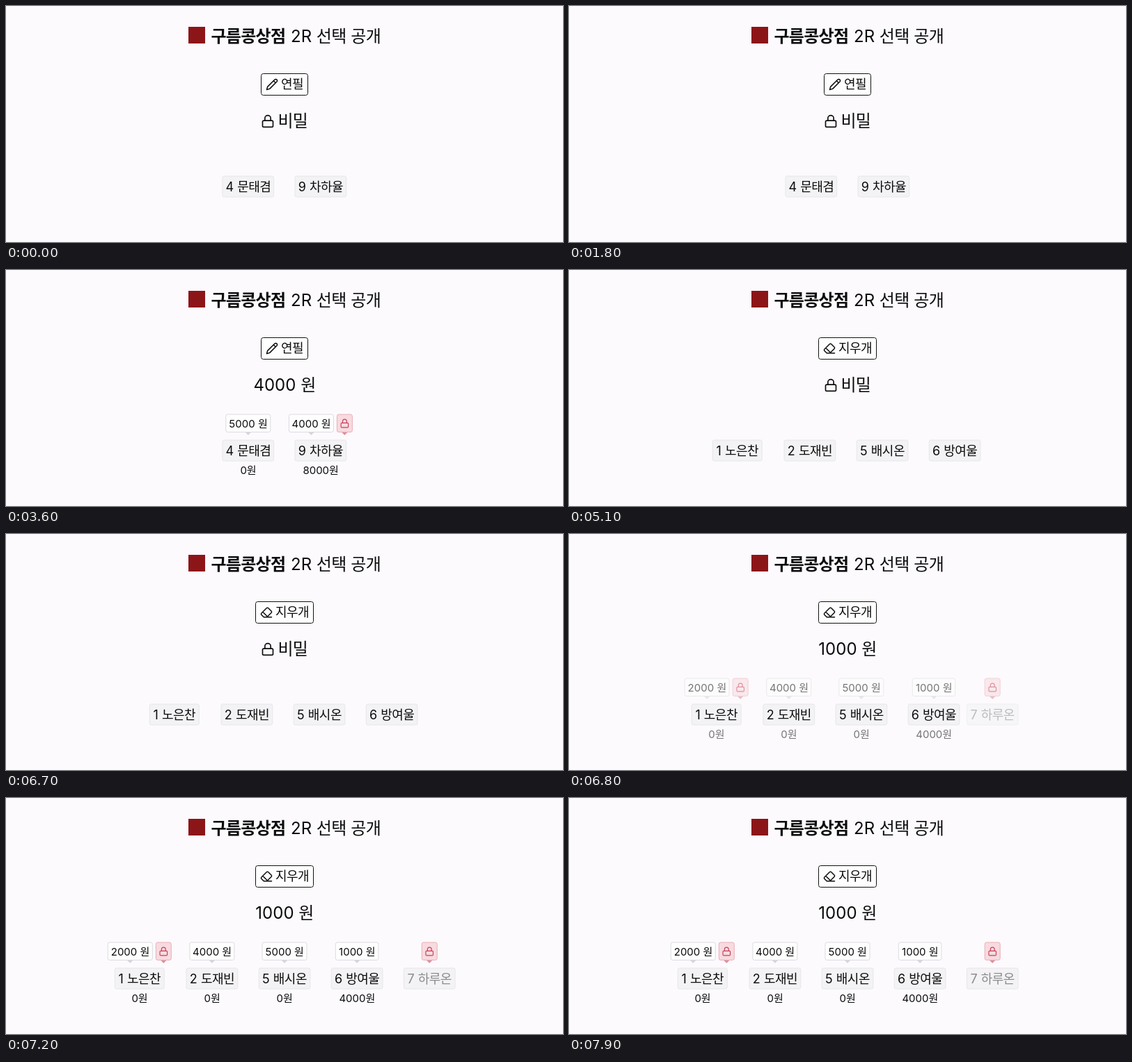
Animation, 800 px wide and 340 px high, one loop 8000 ms. Source, as an HTML page:

```html
<!DOCTYPE html>
<html lang="ko">
<head>
<meta charset="utf-8">
<style>
  html, body { margin: 0; height: 100%; overflow: hidden; background: #fcfafd; }
  svg { display: block; }
  text { font-family: Inter, "Noto Sans CJK KR", "Noto Sans CJK", sans-serif; fill: #0c0c0d; }
  .ko { letter-spacing: -.03em; }
  .icon { fill: none; stroke: #0c0c0d; stroke-width: 2; stroke-linecap: round; stroke-linejoin: round; }
  .red { stroke: #c5405a; }
  .dim { fill: #8b8b8d; }
</style>
</head>
<body>
<svg id="stage" width="800" height="340" viewBox="0 0 800 340"></svg>
<script>
const LOOP = 8000, STEP = 100, SWITCH = 5100, GAP = 104.1;

const ICONS = {
  lock: '<rect x="3" y="11" width="18" height="11" rx="2"/><path d="M7 11V7a5 5 0 0 1 10 0v4"/>',
  pencil: '<path d="M17 3a2.85 2.83 0 1 1 4 4L7.5 20.5 2 22l1.5-5.5ZM15 5l4 4"/>',
  eraser: '<path d="m7 21-4.3-4.3c-1-1-1-2.5 0-3.4l9.6-9.6c1-1 2.5-1 3.4 0l5.6 5.6c1 1 1 2.5 0 3.4L13 21M22 21H7M5 11l9 9"/>'
};

const rounds = [
  { item: '연필', icon: 'pencil', price: '4000 원', reveal: 1800, left: 347.8, shift: 0, players: [
    { name: '4 문태겸', bid: '5000 원', rest: '0원' },
    { name: '9 차하율', bid: '4000 원', rest: '8000원', lock: true }] },
  { item: '지우개', icon: 'eraser', price: '1000 원', reveal: 6700, left: 191.8, shift: 50, players: [
    { name: '1 노은찬', bid: '2000 원', rest: '0원', lock: true },
    { name: '2 도재빈', bid: '4000 원', rest: '0원' },
    { name: '5 배시온', bid: '5000 원', rest: '0원' },
    { name: '6 방여울', bid: '1000 원', rest: '4000원' },
    { name: '7 하루온', lock: true, late: true }] }
];

const text = (x, y, size, s, attrs = 'text-anchor="middle"') =>
  `<text x="${x}" y="${y}" font-size="${size}" ${attrs}>` +
  s.replace(/[가-힣]+/g, '<tspan class="ko">$&</tspan>') + '</text>';

const icon = (name, x, y, size, cls = '') =>
  `<g class="icon ${cls}" transform="translate(${x} ${y}) scale(${size / 24})">${ICONS[name]}</g>`;

const box = (cx, y, w, h, fill, stroke, r = 2.5) =>
  `<rect x="${cx - w / 2 + .5}" y="${y + .5}" width="${w - 1}" height="${h - 1}" rx="${r}" fill="${fill}" stroke="${stroke}"/>`;

const bubble = (cx, w, fill, stroke, tip) =>
  `<path d="M${cx - 4} 234h8l-4 4z" fill="${tip}"/>` + box(cx, 207.5, w, 26.5, fill, stroke);

function bids(p) {
  const w = p.bid ? (p.bid[0] === '1' ? 62.5 : 65) : 0;
  const bidX = p.lock ? -13.5 : 0, lockX = p.bid ? 34.5 : 0;
  let s = '';
  if (p.bid) s += bubble(bidX, w, '#fefefe', '#dcdbde', '#d6d5d9') + text(bidX, 226.5, 15, p.bid);
  if (p.lock) s += bubble(lockX, 23, '#f8dadf', '#e8b0b8', '#d9929d') + icon('lock', lockX - 7, 214, 14, 'red');
  if (p.rest) s += text(0, 294, 15, p.rest);
  return s;
}

function player(p, i, left) {
  const w = p.name[0] === '1' ? 72 : 74.7;
  return `<g transform="translate(${left + GAP * i} 0)"><g ${p.late ? 'class="shown"' : ''}>` +
    box(0, 244.5, w, 31, '#f3f2f4', '#e7e6e8') +
    text(0, 266.5, 18, p.name, `text-anchor="middle" ${p.late ? 'class="dim"' : ''}`) +
    `</g><g class="shown">${bids(p)}</g></g>`;
}

function scene(r) {
  const textWidth = r.item.length * 16, start = 400 - (22 + textWidth) / 2;
  const row = late => r.players.map((p, i) => !p.late === !late ? player(p, i, r.left) : '').join('');
  return '<g class="scene">' +
    box(400, 97, 36 + textWidth, 32, '#fefefe', '#111', 3) +
    icon(r.icon, start, 104, 18) +
    text(start + 22, 119, 18, r.item, '') +
    `<g class="secret">${icon('lock', 366, 156, 20)}${text(390.4, 174, 24, '비밀', '')}</g>` +
    `<g class="price">${text(400, 174, 24, r.price)}</g>` +
    `<g class="movers">${row(false)}</g>${row(true)}</g>`;
}

const stage = document.getElementById('stage');
stage.innerHTML = '<rect x="262" y="30" width="24" height="24" fill="#8c1518"/>' +
  text(294.5, 52, 24, '구름콩상점', 'font-weight="700"') +
  text(409, 52, 24, '2R 선택 공개', '') +
  rounds.map(scene).join('');
const scenes = [...stage.querySelectorAll('.scene')];

const clamp = v => Math.max(0, Math.min(1, v));
const easeOut = p => 1 - (1 - p) ** 3;

function draw(now) {
  const t = Math.floor(now % LOOP / STEP) * STEP;
  const active = t < SWITCH ? 0 : 1;
  scenes.forEach((el, i) => el.style.display = i === active ? '' : 'none');
  const el = scenes[active], r = rounds[active];
  const fade = clamp((t - r.reveal) / 180);
  const move = easeOut(clamp((t - r.reveal - 10) / 340));
  el.querySelectorAll('.shown').forEach(g => g.style.opacity = fade);
  el.querySelector('.secret').style.display = fade ? 'none' : '';
  el.querySelector('.price').style.display = fade ? '' : 'none';
  el.querySelector('.movers').setAttribute('transform', `translate(${r.shift * (1 - move)} 0)`);
  requestAnimationFrame(draw);
}
requestAnimationFrame(draw);
</script>
</body>
</html>
```
